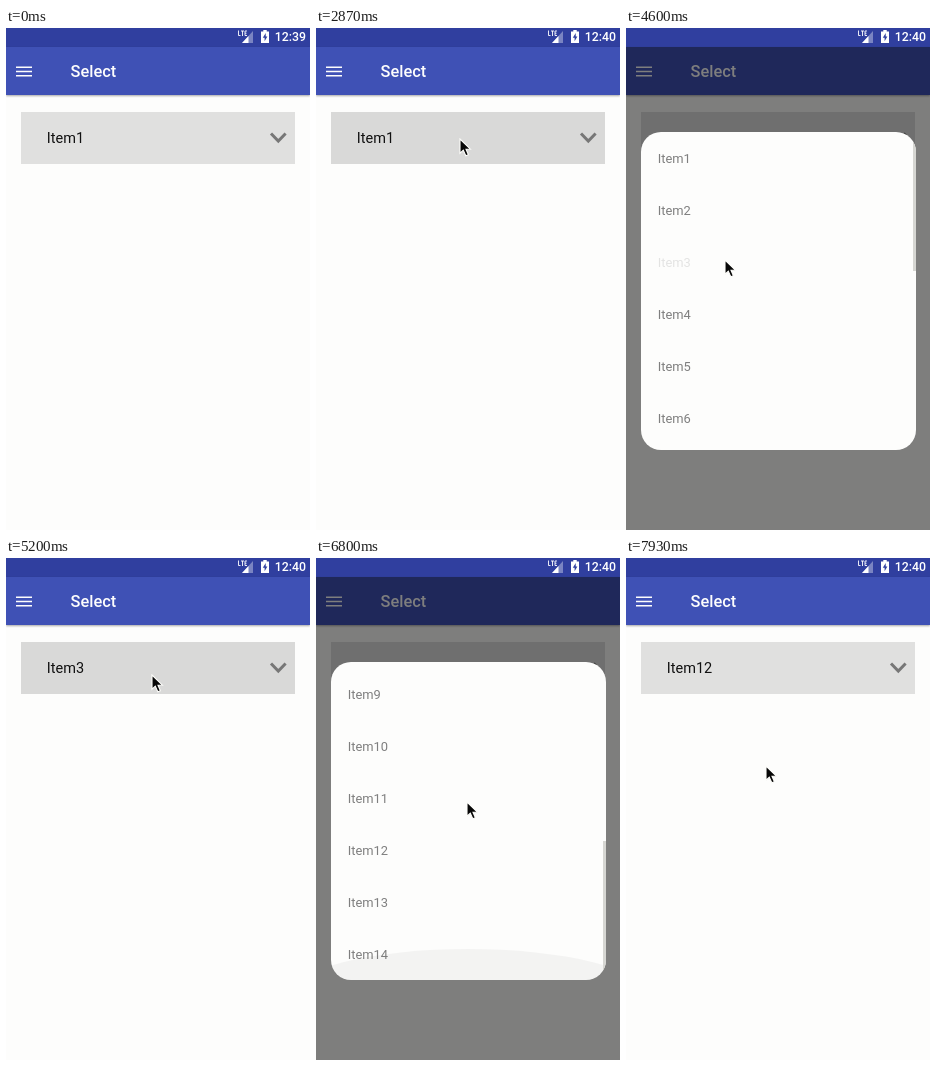
Animation, 304 px wide and 502 px high, one loop 8000 ms. Source, as an HTML page:

```html
<!DOCTYPE html>
<html lang="en">
<head>
<meta charset="utf-8">
<title>Select</title>
<style>
  html, body { margin: 0; width: 100%; height: 100%; overflow: hidden; }
  body { font-family: Roboto, sans-serif; }
  #stage {
    position: relative; width: 304px; height: 502px;
    overflow: hidden; background: #fdfdfc;
  }
  #stage > * { position: absolute; }
  #status { left: 0; top: 0; width: 304px; height: 19px; background: #303f9f; }
  #clock {
    position: absolute; right: 4px; top: 0; color: #fff;
    font-size: 12.3px; font-weight: 500; line-height: 18px;
  }
  #status svg { position: absolute; left: 230px; top: 0; }
  #bar {
    left: 0; top: 19px; width: 304px; height: 48px;
    background: #3f51b5; color: #fdfdfd;
    box-shadow: 0 1px 2px rgba(0, 0, 0, .35);
  }
  #bar b {
    position: absolute; left: 64.5px; top: 0;
    font-size: 16.4px; font-weight: 500; line-height: 49px;
  }
  #bar svg { position: absolute; left: 10px; top: 19px; }
  #field { left: 15px; top: 84px; width: 274px; height: 52px; color: #111; }
  #label { position: absolute; left: 25.8px; font-size: 14.5px; line-height: 53px; }
  #field svg { position: absolute; left: 248px; top: 19px; }
  #shade { left: 0; top: 19px; width: 304px; height: 483px; background: #000; }
  #sheet {
    left: 14.5px; top: 103.5px; width: 275px; height: 318px;
    border-radius: 20px; background: #fdfdfc; overflow: hidden;
  }
  #sheet > * { position: absolute; }
  #list { left: 17.2px; top: 1px; color: #7f7f7f; font-size: 12.9px; line-height: 52px; }
  #list div { height: 52px; }
  #thumb { right: 0; top: 0; width: 3px; height: 139px; background: #d6d6d2; }
  #glow {
    left: -40px; top: 287px; width: 354px; height: 90px;
    border-radius: 50%; background: rgba(0, 0, 0, .04);
  }
  #cursor { left: 0; top: 0; }
</style>
</head>
<body>
<div id="stage">
  <div id="status">
    <svg width="36" height="19">
      <path d="M17 3V15H6Z" fill="#7a84c2"/>
      <path d="M12.5 8V15H6Z" fill="#fff"/>
      <path d="M2.5 2.5V7.5H4.5M5 3H8M6.5 3V8M11 3H9V7.5H11M9 5.2H10.5" fill="none" stroke="#fff" stroke-width=".9"/>
      <path d="M25 3.5H27.3V2H30.7V3.5H33V15H25Z" fill="#fff"/>
      <path d="M29.7 5L26.8 9.7H28.6V13.2L31.4 8.4H29.7Z" fill="#303f9f"/>
    </svg>
    <span id="clock"></span>
  </div>
  <div id="bar">
    <svg width="17" height="12"><path d="M0 1.2H16M0 5.5H16M0 9.8H16" stroke="currentColor" stroke-width="1.6"/></svg>
    <b>Select</b>
  </div>
  <div id="field">
    <span id="label"></span>
    <svg width="20" height="14"><path d="M2 2.5L9.3 10L16.6 2.5" fill="none" stroke="#777" stroke-width="3"/></svg>
  </div>
  <div id="shade"></div>
  <div id="sheet">
    <div id="list"></div>
    <div id="glow"></div>
    <div id="thumb"></div>
  </div>
  <svg id="cursor" width="16" height="22">
    <path d="M1 1V15.2L4.3 12.2L6.8 17.8L9.4 16.7L7 11.2H11.4Z" fill="#080808" stroke="#fdfdfa" stroke-width="1.1"/>
  </svg>
</div>
<script>
const LOOP = 8000, STEP = LOOP / 120;
const ROWS = 14, ROW = 52, VIEW = 318, THUMB = 139, MAX = ROWS * ROW - VIEW;
const GLIDE = 500, FADE = 240, DRAG = 6220;
const $ = id => document.getElementById(id);

const rows = Array.from({ length: ROWS }, (_, i) => {
  const row = document.createElement('div');
  row.textContent = 'Item' + (i + 1);
  $('list').append(row);
  return row;
});

// Progress 0..1 from a start time, eased at both ends.
function ease(t, from, span) {
  const p = Math.min(1, Math.max(0, (t - from) / span));
  return p * p * (3 - 2 * p);
}

// Rises at one time and falls at another.
const pulse = (t, on, off, fade = FADE) => ease(t, on, fade) - ease(t, off, fade);

const picks = [
  { open: 2960, tap: 4440, close: 4700, item: 3 },
  { open: 5420, tap: 7300, close: 7430, item: 12 }
];

// The pointer rests at each spot until it leaves for the next.
const home = { x: 156, y: 199 };
const moves = [
  { at: 1200, x: 143, y: 110 },
  { at: 3700, x: 98, y: 231 },
  { at: 4690, x: 145, y: 116 },
  { at: 5600, x: 150, y: 345 },
  { at: DRAG, x: 150, y: 243 },
  { at: 6820, x: 112, y: 290 },
  { at: 7440, x: 139, y: 207 }
];

function pointer(t) {
  let { x, y } = home;
  for (const m of moves) {
    const p = ease(t, m.at, GLIDE);
    x += (m.x - x) * p;
    y += (m.y - y) * p;
  }
  return `translate(${Math.round(x)}px, ${Math.round(y)}px)`;
}

function draw(t) {
  let open = 0, chosen = 1, held = false;
  for (const p of picks) {
    open += pulse(t, p.open, p.close);
    held ||= t > p.open - FADE && t < p.open + FADE;
    if (t >= p.close) chosen = p.item;
    rows[p.item - 1].style.opacity = 1 - .8 * pulse(t, p.tap, p.close, 120);
  }
  const scroll = ease(t, DRAG, GLIDE);

  $('clock').textContent = t < 500 ? '12:39' : '12:40';
  $('label').textContent = 'Item' + chosen;
  $('field').style.background = held ? '#d9d9d8' : '#e0e0df';
  $('shade').style.opacity = open / 2;
  $('sheet').style.opacity = open;
  $('list').style.transform = `translateY(${-scroll * MAX}px)`;
  $('thumb').style.transform = `translateY(${scroll * (VIEW - THUMB)}px)`;
  $('glow').style.opacity = pulse(t, DRAG + GLIDE - 80, 6860, 140);
  $('cursor').style.visibility = t < 600 ? 'hidden' : 'visible';
  $('cursor').style.transform = pointer(t);
}

const start = performance.now();
function tick() {
  const t = (performance.now() - start) % LOOP;
  draw(Math.floor((t + 6) / STEP) * STEP % LOOP);
  requestAnimationFrame(tick);
}
tick();
</script>
</body>
</html>
```
